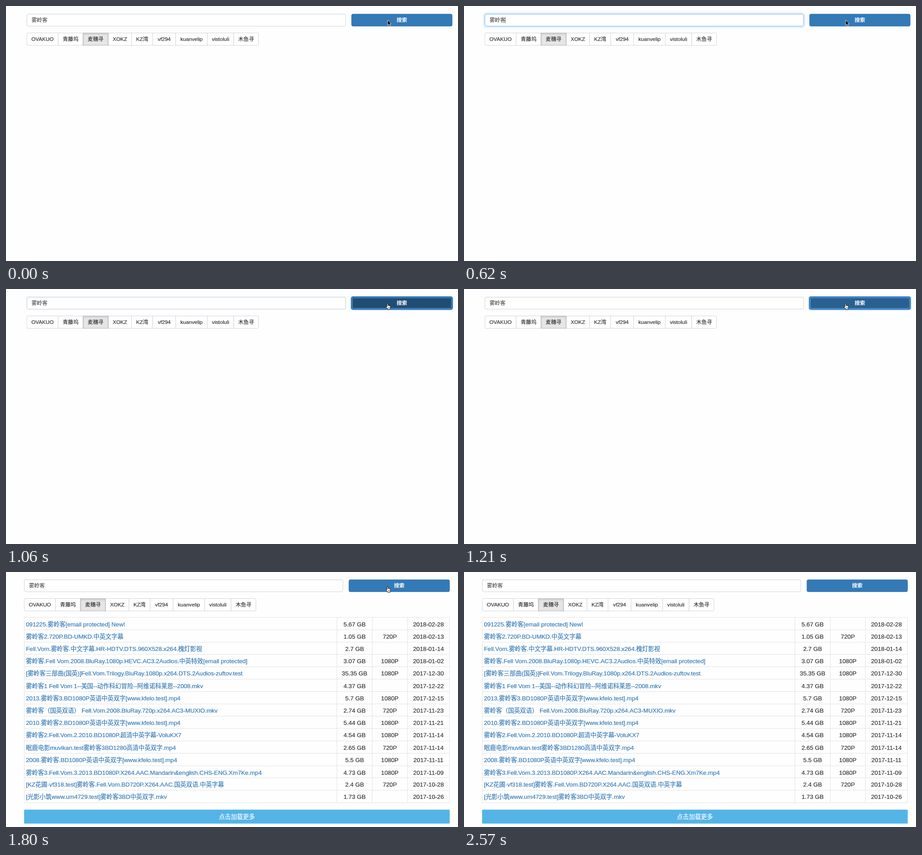
Recreate the animation shown at these times as an HTML page. Size 996 by 562 pixels, loop 3180 ms.

```html
<!DOCTYPE html>
<html lang="zh-CN">
<head>
<meta charset="utf-8">
<style>
html, body { margin: 0; width: 100%; height: 100%; overflow: hidden; background: #fefefe; }
body { position: relative; }
div, svg { position: absolute; box-sizing: border-box; white-space: nowrap; }
/* A 1200px wide page shown at 83% */
#page { left: 0; top: 0; width: 1200px; height: 677px; transform: scale(.83); transform-origin: 0 0;
  font: 14px "Liberation Sans", "Noto Sans CJK SC", "Noto Sans CJK", sans-serif; color: #333; -webkit-text-stroke: .25px; }
#bar { left: 0; top: 0; width: 1200px; height: 110px; }
#field { left: 55px; top: 21px; width: 847px; height: 33px; padding-left: 12px; border: 1px solid #ccc;
  border-radius: 4px; line-height: 31px; color: #555; background: #fff; }
#caret { left: 53px; top: 8px; width: 1px; height: 16px; background: #333; }
#go { left: 917px; top: 21px; width: 268px; height: 33px; border: 1px solid #2e6da4; border-radius: 4px;
  line-height: 31px; text-align: center; font-weight: 700; color: #fff; background: #337ab7; -webkit-text-stroke: 0; }
#go.hover { background: #286090; border-color: #204d74; }
#go.press { background: #204d74; border-color: #122b40; }
#go.ring { box-shadow: 0 0 1px 2px #69b0f5, inset 0 0 0 2px #559de8; }
.tab { top: 71px; height: 34px; border: 1px solid #ccc; line-height: 32px; text-align: center; background: #fff; }
.tab:first-child { border-radius: 4px 0 0 4px; }
.tab:last-child { border-radius: 0 4px 4px 0; }
.tab.on { background: #e6e6e6; border-color: #adadad; box-shadow: inset 0 3px 5px rgba(0,0,0,.125); z-index: 1; }
#wait { left: 500px; top: 120px; width: 240px; text-align: center; font-size: 22px; line-height: 34px; }
#list { left: 48px; top: 120px; width: 1130px; height: 493px; border: 1px solid #ddd; border-top: 0; font-size: 16px; }
.cell { height: 34px; line-height: 35px; border-top: 1px solid #ddd; border-left: 1px solid #ddd; text-align: center; }
.cell.name { border-left: 0; padding-left: 4px; text-align: left; color: #337ab7; letter-spacing: -.06px; }
#more { left: 48px; top: 631px; width: 1130px; height: 37px; border-radius: 2px; background: #54b4e7;
  color: #fff; font-size: 16px; line-height: 37px; text-align: center; }
svg { left: 0; top: 0; width: 996px; height: 562px; }
</style>
</head>
<body>
<div id="page">
  <div id="bar">
    <div id="field">雾岭客<div id="caret"></div></div>
    <div id="go">搜索</div>
    <div id="tabs"></div>
  </div>
  <div id="wait">加载中...</div>
  <div id="results"><div id="list"></div><div id="more">点击加载更多</div></div>
</div>
<svg>
  <path id="arrow" transform="translate(841 31)" d="M0 0V11.5L2.7 9 4.4 13 6.3 12.2 4.6 8.3H8Z" stroke="#fff" stroke-width=".8"/>
  <g id="hand" stroke="#000" stroke-width=".9" stroke-linejoin="round">
    <path fill="#fff" d="M3 7.5L2.2 2Q2.1 .6 3.2 .6T4.4 1.8L5 5Q6 4.4 6.7 5.3 7.8 4.8 8.4 5.8 9.8 5.4 10 7L10.2 9.5Q10 11.5 9.3 12V13.5H4.2V12.4Q2.5 10.8 .6 8.2 .2 6.9 1.4 6.9 2.3 7 3 7.5Z"/>
    <path stroke-width=".6" d="M5.2 8.6V11.2M6.8 8.6V11.2M8.4 8.6V11.2"/>
  </g>
</svg>
<script>
const $ = id => document.getElementById(id);

const tabNames = ['OVAKUO', '青藤坞', '麦穗寻', 'XOKZ', 'KZ湾', 'vf294', 'kuanvelip', 'vistoluli', '木鱼寻'];
const edges = [55, 138, 204, 271, 333, 389, 450, 534, 604, 670];
$('tabs').innerHTML = tabNames.map((name, i) =>
  `<div class="tab${i == 2 ? ' on' : ''}" style="left:${edges[i]}px;width:${edges[i + 1] - edges[i] + 1}px">${name}</div>`).join('');

// title | size in GB | resolution | date
const rows = `091225.雾岭客[email protected] New!|5.67||2018-02-28
雾岭客2.720P.BD-UMKD.中英文字幕|1.05|720P|2018-02-13
Fell.Vom.雾岭客.中文字幕.HR-HDTV.DTS.960X528.x264.槐灯影视|2.7||2018-01-14
雾岭客.Fell Vom.2008.BluRay.1080p.HEVC.AC3.2Audios.中英特效[email protected]|3.07|1080P|2018-01-02
[雾岭客三部曲(国英)]Fell.Vom.Trilogy.BluRay.1080p.x264.DTS.2Audios-zuftov.test|35.35|1080P|2017-12-30
雾岭客1 Fell Vom 1--美国--动作科幻冒险--阿维诺科莱恩--2008.mkv|4.37||2017-12-22
2013.雾岭客3.BD1080P英语中英双字[www.kfelo.test].mp4|5.7|1080P|2017-12-15
雾岭客（国英双语） Fell.Vom.2008.BluRay.720p.x264.AC3-MUXIO.mkv|2.74|720P|2017-11-23
2010.雾岭客2.BD1080P英语中英双字[www.kfelo.test].mp4|5.44|1080P|2017-11-21
雾岭客2.Fell.Vom.2.2010.BD1080P.超清中英字幕-VoluKX7|4.54|1080P|2017-11-14
眠鹿电影muvikan.test雾岭客3BD1280高清中英双字.mp4|2.65|720P|2017-11-14
2008.雾岭客.BD1080P英语中英双字[www.kfelo.test].mp4|5.5|1080P|2017-11-11
雾岭客3.Fell.Vom.3.2013.BD1080P.X264.AAC.Mandarin&amp;english.CHS-ENG.Xm7Ke.mp4|4.73|1080P|2017-11-09
[KZ花圃·vf318.test]雾岭客.Fell.Vom.BD720P.X264.AAC.国英双语.中英字幕|2.4|720P|2017-10-28
[光影小筑www.um4729.test]雾岭客3BD中英双字.mkv|1.73||2017-10-26`.split('\n');
const cols = [0, 829, 923, 1016, 1128];
$('list').innerHTML = rows.map((row, i) => row.split('|').map((text, c) =>
  `<div class="cell${c ? '' : ' name'}" style="left:${cols[c]}px;width:${cols[c + 1] - cols[c]}px;top:${i * 32.8}px">${text}${c == 1 ? ' GB' : ''}</div>`
).join('')).join('');

const show = (id, on) => $(id).style.display = on ? '' : 'none';
const within = (t, a, b) => t >= a && t < b;

// Latest entry whose start time has passed
const pick = (steps, t) => steps.filter(s => s[0] <= t).pop()[1];
const focusSteps = [[0, 0], [440, .25], [620, 1], [1060, .25], [1210, 0]];
const buttonSteps = [[0, ''], [770, 'hover'], [1060, 'press ring'], [1210, 'hover ring'], [1500, ''], [2390, 'hover'], [2570, '']];

function draw(t) {
  const f = pick(focusSteps, t), mix = (a, b) => a + (b - a) * f;
  const done = t >= 1800;
  $('field').style.borderColor = `rgb(${mix(204, 102)},${mix(204, 175)},${mix(204, 233)})`;
  $('field').style.boxShadow = `inset 0 1px 1px rgba(0,0,0,.075), 0 0 ${8 * f}px rgba(102,175,233,${.6 * f})`;
  show('caret', within(t, 440, 910));
  $('go').className = pick(buttonSteps, t);
  $('bar').style.transform = done ? 'translate(-7px,-1px)' : '';
  show('wait', within(t, 1650, 1800));
  show('results', done);
  show('arrow', t < 770);
  show('hand', within(t, 770, 2570));
  $('hand').setAttribute('transform', `translate(837 ${t < 2390 ? 31.5 : 44.5})`);
}

const start = performance.now();
function tick() {
  draw((performance.now() - start) % 3180);
  requestAnimationFrame(tick);
}
tick();
</script>
</body>
</html>
```
